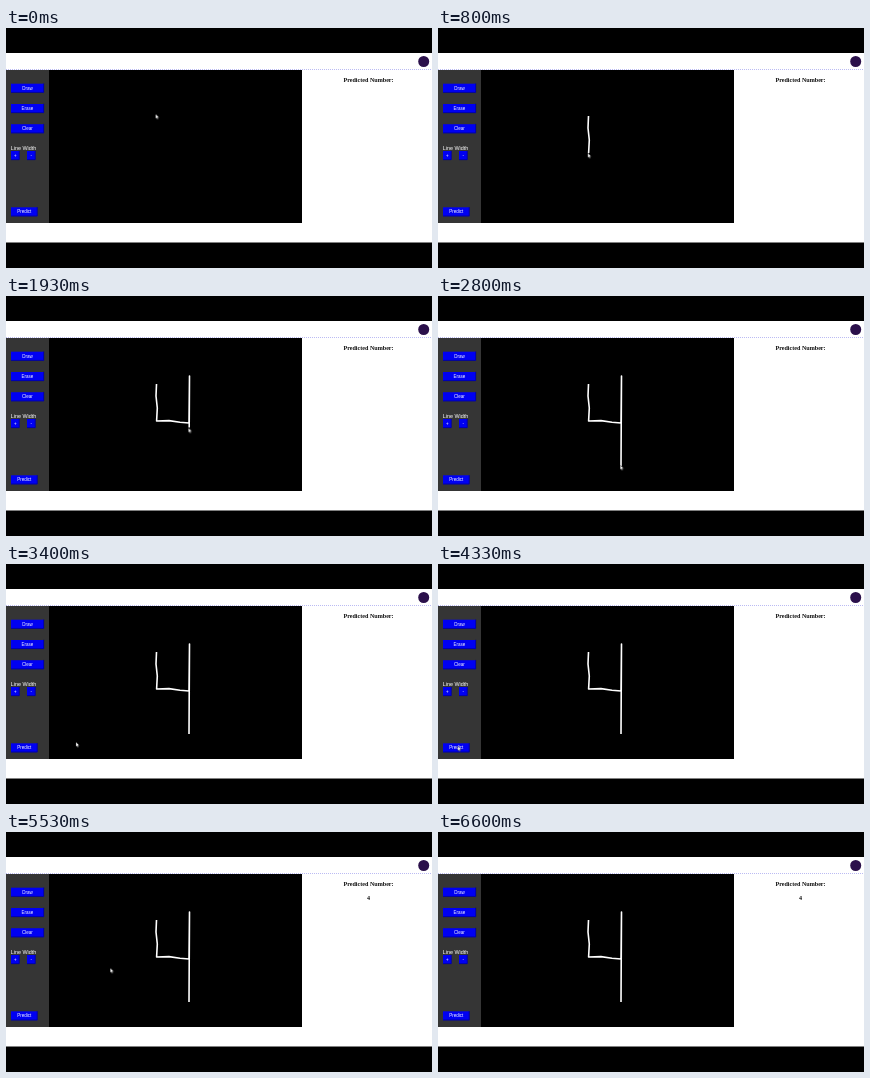
Recreate the animation shown at these times as an HTML page. Size 426x240 px, loop 6.67 s.

```html
<!DOCTYPE html>
<html lang="en">
<head>
<meta charset="utf-8">
<title>Digit prediction</title>
<style>
  html, body { margin: 0; width: 100%; height: 100%; overflow: hidden; background: #000; }
  svg { display: block; width: 100vw; height: 100vh; }
  .ui { font-family: "Liberation Sans", Arial, sans-serif; font-size: 4.5px; fill: #fff; }
  .ui text { text-anchor: middle; }
  .ui .label { text-anchor: start; font-size: 5.4px; }
  .button { fill: #0000f2; }
  .edge { fill: none; stroke: #000086; stroke-width: .7; }
  .result { font: bold 6.1px "Liberation Serif", Times, serif; text-anchor: middle; fill: #111; }

  .ink {
    fill: none; stroke: #fff; stroke-width: 1.6; stroke-linejoin: round;
    stroke-dasharray: 207 300;
    animation: draw 6.67s linear infinite;
  }
  .cursor { animation: move 6.67s linear infinite; }
  .answer { animation: answer 6.67s step-end infinite; }

  /* down, across, up, then the long stroke down */
  @keyframes draw {
    0%, 2.2%      { stroke-dashoffset: 207; }
    11.4%, 12.7%  { stroke-dashoffset: 169.9; }
    17.2%         { stroke-dashoffset: 137.3; }
    22.2%         { stroke-dashoffset: 90.3; }
    28.9%         { stroke-dashoffset: 39; }
    36%, 100%     { stroke-dashoffset: 0; }
  }
  @keyframes move {
    0%, 2.2%      { transform: translate(149.6px, 86px); }
    11.4%, 12.7%  { transform: translate(149.8px, 125px); }
    17.2%         { transform: translate(182.4px, 127px); }
    22.2%         { transform: translate(182.8px, 80px); }
    28.9%         { transform: translate(182.4px, 131.5px); }
    36%, 43%      { transform: translate(182.2px, 169px); animation-timing-function: ease-in-out; }
    56%, 73%      { transform: translate(19.7px, 182px); animation-timing-function: ease-out; }
    81%, 84%      { transform: translate(104.3px, 136px); animation-timing-function: ease-in; opacity: 1; }
    93%           { transform: translate(240px, 30px); opacity: 1; }
    93.01%, 100%  { transform: translate(240px, 30px); opacity: 0; }
  }
  @keyframes answer {
    0%   { visibility: hidden; }
    72%  { visibility: visible; }
    100% { visibility: visible; }
  }
</style>
</head>
<body>
<svg viewBox="0 0 426 240" preserveAspectRatio="none">
  <rect width="426" height="240"/>
  <rect y="25" width="426" height="189.5" fill="#fff"/>
  <path d="M0 41.5H426" stroke="#aaaaf0" stroke-width=".8" stroke-dasharray="1 1"/>
  <circle cx="417.7" cy="33.5" r="5.5" fill="#2b104b"/>

  <rect y="42" width="43" height="153" fill="#353535"/>
  <rect x="43" y="42" width="253" height="153"/>

  <g class="ui" id="panel">
    <text class="label" x="4.7" y="122.4">Line Width</text>
  </g>

  <text class="result" x="362.5" y="54">Predicted Number:</text>
  <text class="result answer" x="362.5" y="68.4">4</text>

  <path class="ink" d="M150.5 88L150 100L151.3 112L150.6 125L163 124.6L174 126.2L183 127L183.5 80L183 170"/>
  <path class="cursor" d="M0 0V4.8L1.1 3.8L1.8 5.5L2.6 5.1L1.9 3.5H3.4Z" fill="#fff" stroke="#000" stroke-width=".3"/>
</svg>
<script>
  const panel = document.getElementById("panel");

  function add(tag, attrs, text = "") {
    const node = document.createElementNS("http://www.w3.org/2000/svg", tag);
    for (const key in attrs) node.setAttribute(key, attrs[key]);
    node.textContent = text;
    panel.append(node);
  }

  function button(label, x, y, width) {
    const height = 9;
    add("rect", { class: "button", x, y, width, height });
    add("path", { class: "edge", d: `M${x} ${y + height - .3}h${width - .3}v${-height}` });
    add("text", { x: x + width / 2, y: y + 6 }, label);
  }

  button("Draw", 5, 55.7, 33);
  button("Erase", 5, 76, 33);
  button("Clear", 5, 96.2, 33);
  button("+", 5, 123, 8.5);
  button("-", 21, 123, 8.5);
  button("Predict", 5, 179.3, 26.5);
</script>
</body>
</html>
```
